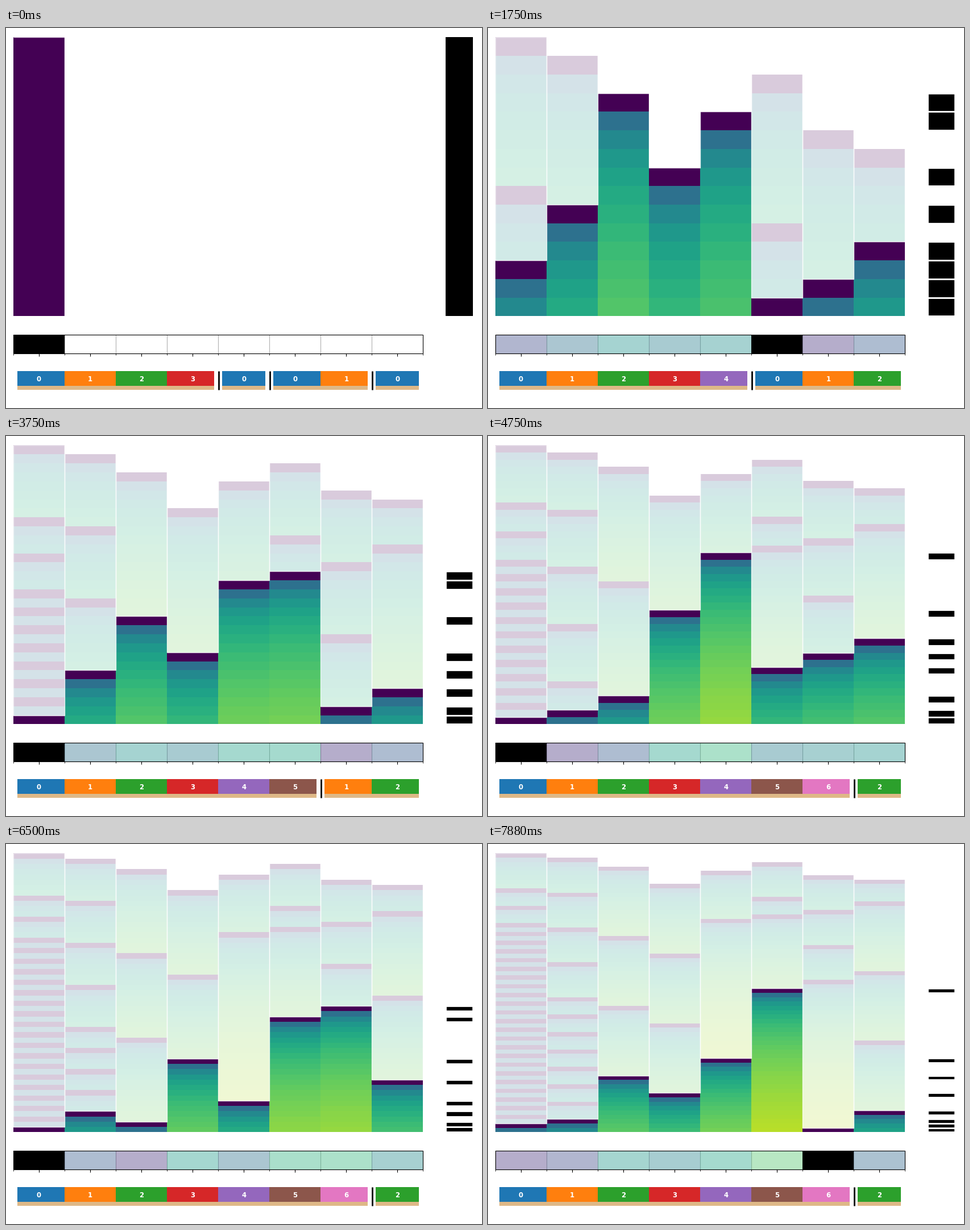
A matplotlib script for the animation above (8000 ms loop, 837 by 669 pixels).

```python
import numpy as np
import matplotlib.pyplot as plt
from matplotlib.animation import FuncAnimation
from matplotlib.colors import LogNorm
from matplotlib.patches import Rectangle

W, H, DPI = 837, 669, 100
STEPS, SLOTS = 64, 8
LEFT, RIGHT = 12.9, 733.3
TOP, BOTTOM = 16.5, 507.4
STRIP = (540, 573.3)
CELL = (RIGHT - LEFT) / SLOTS
EDGES = LEFT + CELL * np.arange(SLOTS + 1)

VIRIDIS = plt.get_cmap("viridis")
TAB10 = plt.get_cmap("tab10")
DEPTH_NORM = LogNorm(0.1, 64.1)
AGE_NORM = LogNorm(1, 128)

# Reserved hanoi value of every slot, per epoch
LAYOUTS = ["01230010", "01234012", "01234512", "01234562"]
FIRST_FILL = [0, 1, 5, 2, 4, 6, 7, 3]


def layout(t):
    epoch = max(0, int(t).bit_length() - 3)
    return [int(c) for c in LAYOUTS[epoch]]


def site(t):
    """Slot that receives item t: ring buffer over slots of its hanoi value."""
    if t < SLOTS:
        return FIRST_FILL[t]
    n = t + 1
    h = (n & -n).bit_length() - 1
    slots = [i for i, v in enumerate(layout(t)) if v == h]
    return slots[(t >> (h + 1)) % len(slots)]


# LAST[t, s]: newest item held by slot s after step t (-1 when empty)
LAST = np.full((STEPS, SLOTS), -1)
for t in range(STEPS):
    if t:
        LAST[t] = LAST[t - 1]
    LAST[t, site(t)] = t

# The small margin keeps the pixel size from rounding down
fig = plt.figure(figsize=((W + 0.01) / DPI, (H + 0.01) / DPI), dpi=DPI,
                 facecolor="white")
ax = fig.add_axes([0, 0, 1, 1])
ax.set(xlim=(0, W), ylim=(H, 0))
ax.axis("off")
moving = []


def rect(x0, y0, x1, y1, **kw):
    kw = {"lw": 0, "zorder": 2, **kw}
    return ax.add_patch(Rectangle((x0, y0), x1 - x0, y1 - y0, **kw))


def vline(x, y0, y1, lw=0.8, color="black", zorder=5):
    return ax.plot([x, x], [y0, y1], color=color, lw=lw, zorder=zorder,
                   solid_capstyle="butt")[0]


def draw_strip_axes():
    y0, y1 = STRIP
    rect(LEFT, y0, RIGHT, y1, fc="none", ec="black", lw=0.8, zorder=5)
    for i, x in enumerate(EDGES):
        vline(x, y1, y1 + 2.8, lw=0.6)
        if 0 < i < SLOTS:
            vline(x, y0, y1, color="#b0b0b0", zorder=1)
        if i < SLOTS:
            vline(x + CELL / 2, y1, y1 + 4.9)


def draw_history(t):
    rows = np.arange(t + 1)[:, None]
    depth = np.ma.masked_where(LAST[:t + 1] < 0, rows - LAST[:t + 1] + 0.1)
    ys = np.linspace(TOP, BOTTOM, t + 2)
    moving.append(ax.pcolormesh(EDGES, ys, depth, cmap=VIRIDIS,
                                norm=DEPTH_NORM, zorder=1))
    # Veil everything above the current item of each slot
    for s, last in enumerate(LAST[t]):
        end = ys[last] if last >= 0 else BOTTOM
        moving.append(rect(EDGES[s], TOP, EDGES[s + 1], end, fc="white",
                           ec="white", lw=1, alpha=0.8))


def draw_retained(t):
    step = (BOTTOM - TOP) / (t + 1)
    for last in sorted(LAST[t]):
        if last >= 0:
            y = TOP + last * step
            moving.append(rect(772.5, y, 821, y + step, fc="black",
                               ec="white", lw=2 if t else 0))


def draw_strip(t):
    for s, last in enumerate(LAST[t]):
        if last < 0:
            continue
        age = t - last
        look = {"fc": "black"}
        if age:
            look = {"fc": VIRIDIS(AGE_NORM(age + 1)), "alpha": 0.4}
        moving.append(rect(EDGES[s], STRIP[0], EDGES[s + 1], STRIP[1], **look))


def draw_reservations(t):
    values = layout(t)
    y0, y1, y2 = 604, 630.5, 637
    for s, v in enumerate(values):
        opens = s == 0 or v != values[s - 1] + 1
        closes = s == SLOTS - 1 or values[s + 1] != v + 1
        x0 = EDGES[s] + 7 * opens
        x1 = EDGES[s + 1] - 7 * closes
        moving.append(rect(x0, y0, x1, y1, fc=TAB10(v)))
        moving.append(rect(x0, y1, x1, y2, fc="burlywood"))
        moving.append(ax.text(EDGES[s] + CELL / 2, 617, str(v), color="white",
                              family="DejaVu Sans", weight="bold",
                              size=8.33, ha="center", va="center_baseline",
                              zorder=6))
        if opens and s:
            moving.append(vline(EDGES[s] + 0.4, y0, y2, lw=2))


def update(t):
    while moving:
        moving.pop().remove()
    draw_history(t)
    draw_retained(t)
    draw_strip(t)
    draw_reservations(t)
    return list(moving)


draw_strip_axes()
anim = FuncAnimation(fig, update, frames=STEPS, interval=125,
                     init_func=lambda: [], repeat=True, repeat_delay=0)
plt.show()
```
